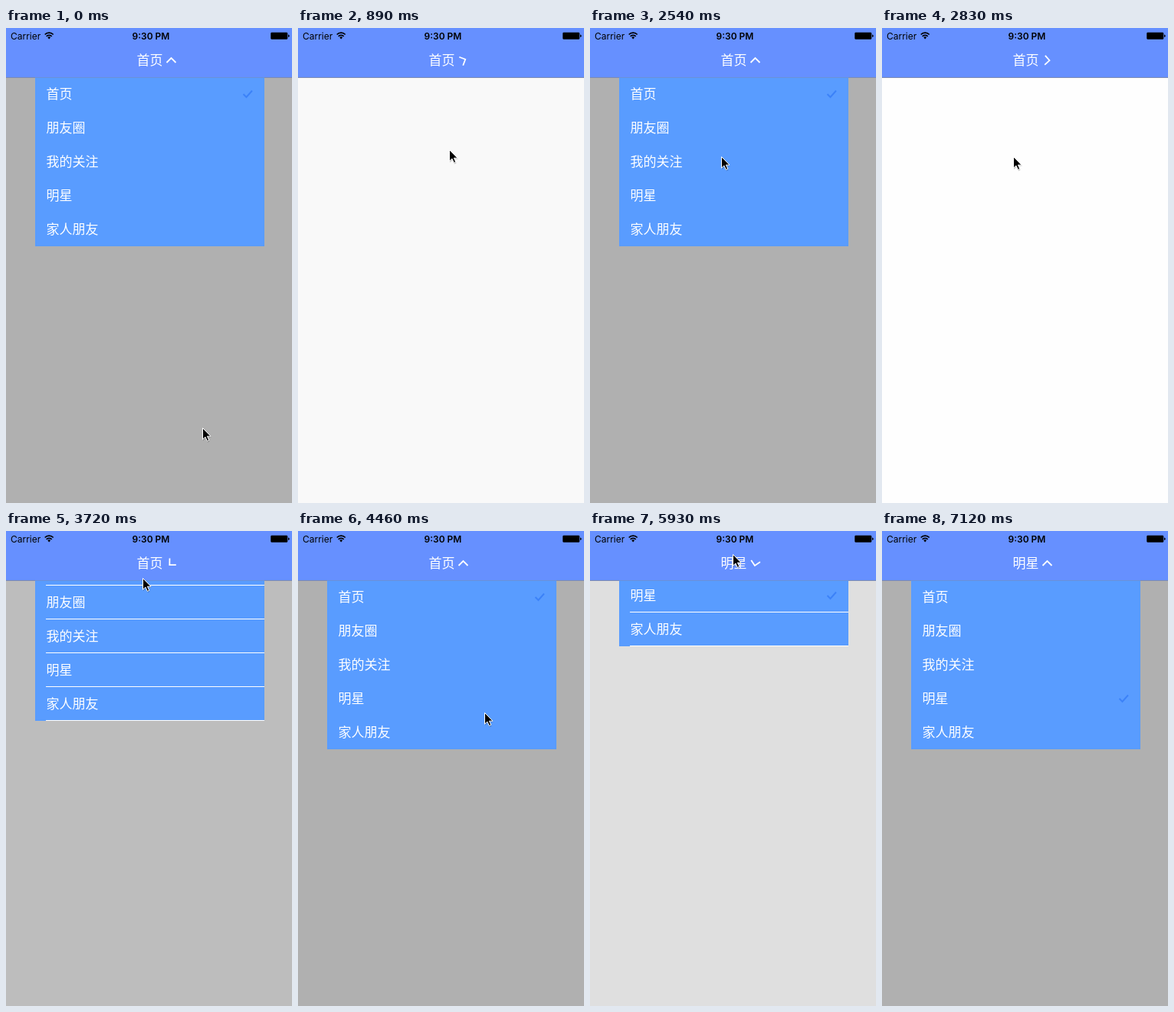
Animation of 373 by 618 pixels, one loop 7380 ms. Source, as an HTML page:

```html
<!DOCTYPE html>
<html lang="zh">
<head>
<meta charset="utf-8">
<style>
html, body { margin: 0; width: 100%; height: 100%; overflow: hidden; background: #fefefe; }
svg { display: block; width: 373px; height: 618px; }
.cjk { font: 400 17px "Noto Sans CJK SC", "Noto Sans CJK", sans-serif; fill: #fff; }
.status { font: 400 12px Inter, sans-serif; }
</style>
</head>
<body>
<svg viewBox="0 0 373 618">
  <defs><clipPath id="below"><path d="M0 64.5H373V618H0z"/></clipPath></defs>
  <rect width="373" height="618" fill="#fefefe"/>
  <rect width="373" height="64.5" fill="#6690ff"/>
  <rect y="64" width="373" height="1" fill="#000" opacity=".3"/>
  <g clip-path="url(#below)">
    <rect id="shade" y="65" width="373" height="553"/>
    <g id="menu">
      <rect x="38" y="-300" width="299" height="584" fill="#599cff"/>
      <g id="rows" class="cjk"></g>
      <g id="lines" fill="#fff"></g>
      <path id="check" d="M309.5 0 313.5 4 321-4.5" fill="none" stroke="#3c82f8" stroke-width="2"/>
    </g>
  </g>
  <text class="status" x="6" y="14.5">Carrier</text>
  <text class="status" x="189" y="14.5" text-anchor="middle" style="font-weight:600">9:30 PM</text>
  <g fill="none" stroke="#000" stroke-width="1.7">
    <path d="M50.7 8.5a7.7 7.7 0 0 1 11 0M52.7 10.8a4.9 4.9 0 0 1 7 0"/>
    <path d="M54.3 12.3a2.7 2.7 0 0 1 3.8 0L56.2 14.4z" fill="#000" stroke="none"/>
  </g>
  <rect x="345.5" y="6" width="21.5" height="8.5" rx="1" fill="#000" stroke="#000" stroke-opacity=".5"/>
  <path d="M368 8.5q1.6.3 1.6 1.8t-1.6 1.8z"/>
  <text id="title" class="cjk" x="170.5" y="48"></text>
  <path id="arrow" d="M-6-3 0 3 6-3" fill="none" stroke="#fff" stroke-width="1.8"/>
  <g id="cursor">
    <path d="M1 2V17L4.5 13.8 7 19 9.6 18 7.3 12.6H12z" opacity=".2"/>
    <path d="M.5.5V15.2L3.9 12 6.4 17.4 8.8 16.3 6.4 11.2H11z" stroke="#fff"/>
  </g>
</svg>
<script>
const LOOP = 7380, STEP = 148.3, FIRST = 300, LAST_STEP = 46;
const TOP = 64, ROW = 44;
const items = ['首页', '朋友圈', '我的关注', '明星', '家人朋友'];
const toggles = [
  { at: -2000, open: true },
  { at: 683, open: false },
  { at: 1596, open: true },
  { at: 2566, open: false },
  { at: 3536, open: true },
  { at: 4500, open: false },
  { at: 5700, open: true }
];
const PICK_TIME = 4500;

// time, x, y of the pointer tip
const path = [
  [0, 256, 520], [220, 256, 520], [640, 197, 158], [940, 197, 158],
  [1480, 183, 43], [1800, 183, 43], [2480, 171, 167], [2880, 171, 167],
  [3430, 179, 47], [3540, 179, 47], [3705, 178, 61], [3740, 178, 61],
  [4380, 243, 236], [4760, 243, 236], [5040, 198, 114], [5200, 198, 114],
  [5610, 186, 29], [5760, 186, 29], [6375, 201, 228], [6420, 202, 230],
  [7080, 352, 640], [LOOP, 352, 640]
];

const $ = id => document.getElementById(id);
const smooth = u => u * u * (3 - 2 * u);

function easeInOut(x) {
  if (x <= 0) return 0;
  if (x >= 1) return 1;
  let lo = 0, hi = 1;
  for (let i = 0; i < 24; i++) {
    const u = (lo + hi) / 2, v = 1 - u;
    if (1.26 * u * v * v + 1.74 * u * u * v + u ** 3 < x) lo = u; else hi = u;
  }
  return smooth(lo);
}

// 0.75 s spring, damping ratio 0.7, initial velocity 0.5
function spring(s) {
  if (s >= 0.75) return 1;
  const decay = 9.2, freq = 9.4;
  return 1 - Math.exp(-decay * s) *
    (Math.cos(freq * s) + (decay - 0.5) / freq * Math.sin(freq * s));
}

function pointer(t) {
  const i = path.findIndex(p => p[0] > t);
  const [t0, x0, y0] = path[i - 1], [t1, x1, y1] = path[i];
  const k = smooth((t - t0) / (t1 - t0));
  return [x0 + (x1 - x0) * k, y0 + (y1 - y0) * k];
}

const rowMiddle = i => TOP + ROW * (i + 0.5);
$('rows').innerHTML = items.map((s, i) =>
  `<text x="52.5" y="${rowMiddle(i) + 6}">${s}</text>`).join('');
$('lines').innerHTML = items.map((s, i) =>
  `<rect x="52" y="${TOP + ROW * (i + 1) - 1}" width="285" height="1"/>`).join('');

function render(t) {
  const { at, open } = toggles.filter(e => e.at <= t).pop();
  const s = (t - at) / 1000;
  const progress = spring(s);
  const offset = Math.round(open ? -ROW * items.length * (1 - progress) : -320 * progress);
  const shown = open ? progress : 1 - progress;
  const picked = t < PICK_TIME ? 0 : 3;
  const angle = (open ? 0 : 180) + 180 * easeInOut(s / 0.5);

  $('menu').setAttribute('transform', `translate(0 ${offset})`);
  $('menu').style.display = !open && offset <= -220 ? 'none' : '';
  $('lines').style.display = offset ? '' : 'none';
  $('shade').setAttribute('opacity', Math.max(0, 0.31 * shown));
  $('check').setAttribute('transform', `translate(0 ${rowMiddle(picked)})`);
  $('title').textContent = items[picked];
  $('arrow').setAttribute('transform', `translate(215.5 42) rotate(${angle})`);
  $('cursor').setAttribute('transform', `translate(${pointer(t).map(Math.round).join(' ')})`);
}

function stepped(t) {
  const k = Math.floor((t - FIRST + 4) / STEP);
  return k < 0 ? 0 : FIRST + STEP * Math.min(k, LAST_STEP);
}

const start = performance.now();
function tick() {
  render(stepped((performance.now() - start) % LOOP));
  requestAnimationFrame(tick);
}
tick();
</script>
</body>
</html>
```
